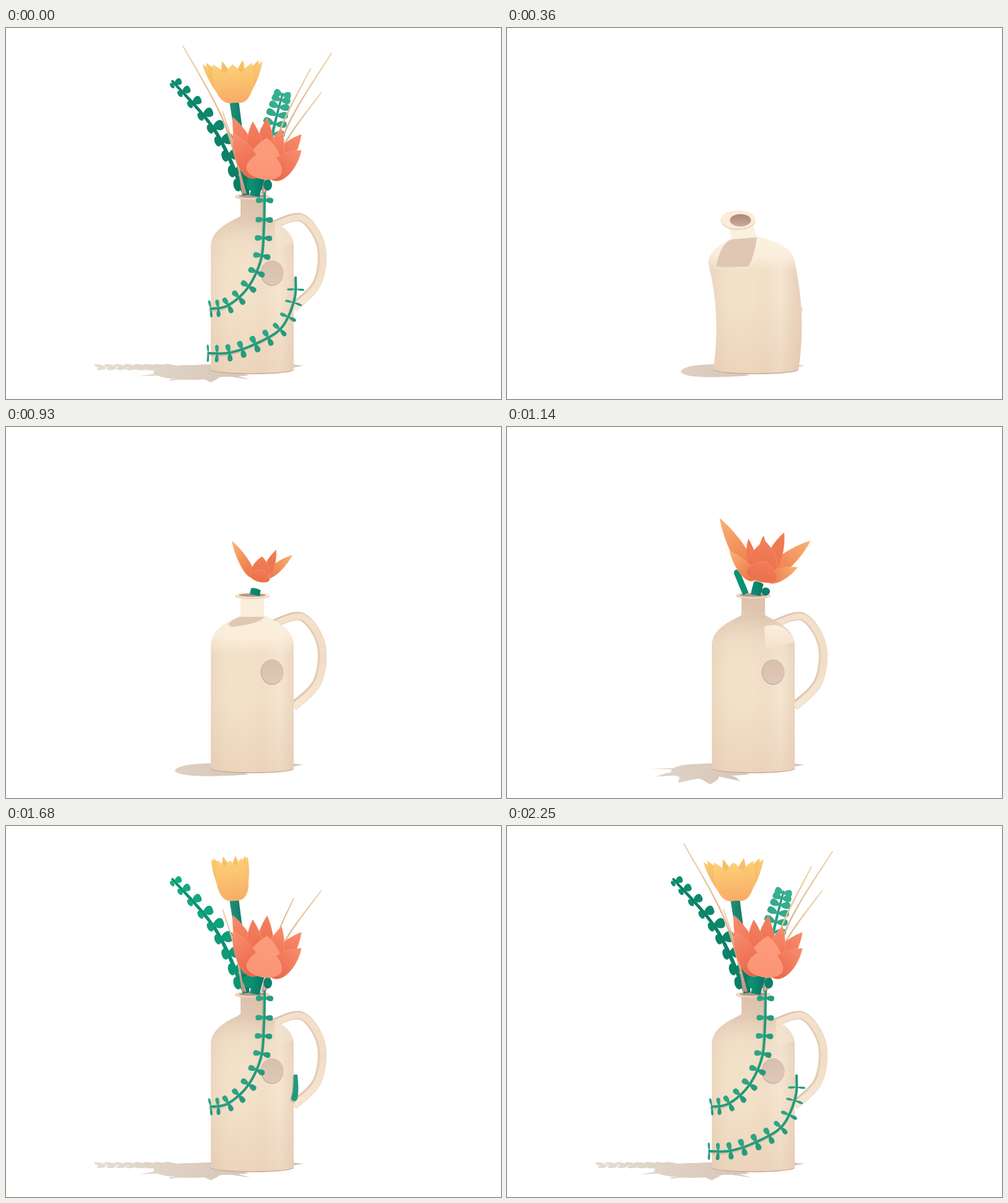
An HTML page with a canvas that plays this animation: 800 px wide and 600 px high, repeating every 2.95 s.

```html
<!DOCTYPE html>
<html lang="en">
<head>
<meta charset="utf-8">
<title>Growing bouquet</title>
<style>
html, body { margin: 0; width: 100%; height: 100%; overflow: hidden; background: #fff; }
canvas { display: block; width: 100vw; height: 100vh; }
</style>
</head>
<body>
<canvas id="stage" width="800" height="600"></canvas>
<script>
const ctx = document.getElementById('stage').getContext('2d');
const LOOP = 2950, STEP = 30, END = 2250, TAU = Math.PI * 2;

const clamp = v => Math.max(0, Math.min(1, v));
const mix = (a, b, k) => a + (b - a) * k;
const ramp = (t, from, to) => clamp((t - from) / (to - from));
const ease = (t, from, to) => { const k = ramp(t, from, to); return k * k * (3 - 2 * k); };

// Piecewise linear value through [time, value] pairs.
function keyed(t, ...keys) {
  for (let i = 1; i < keys.length; i++)
    if (t < keys[i][0]) return mix(keys[i - 1][1], keys[i][1], ramp(t, keys[i - 1][0], keys[i][0]));
  return keys[keys.length - 1][1];
}

function tint(a, b, k) {
  const part = (c, i) => parseInt(c.slice(i, i + 2), 16);
  const hex = i => Math.round(mix(part(a, i), part(b, i), clamp(k))).toString(16).padStart(2, '0');
  return '#' + hex(1) + hex(3) + hex(5);
}

function gradient(x0, y0, x1, y1, ...colors) {
  const g = ctx.createLinearGradient(x0, y0, x1, y1);
  colors.forEach((c, i) => g.addColorStop(i / (colors.length - 1), c));
  return g;
}

function fill(style) { ctx.fillStyle = style; ctx.fill(); }

function oval(x, y, rx, ry, style, turn = 0) {
  ctx.beginPath();
  ctx.ellipse(x, y, Math.max(0, rx), Math.max(0, ry), turn, 0, TAU);
  fill(style);
}

function polygon(points) {
  points.forEach(([x, y], i) => i ? ctx.lineTo(x, y) : ctx.moveTo(x, y));
  ctx.closePath();
}

// Point on a smooth curve through the given points.
function along(points, u) {
  const n = points.length - 1, s = clamp(u) * n, i = Math.min(n - 1, s | 0), f = s - i;
  const a = points[Math.max(i - 1, 0)], b = points[i], c = points[i + 1], d = points[Math.min(i + 2, n)];
  return [0, 1].map(k => b[k] + .5 * f * (c[k] - a[k] +
    f * (2 * a[k] - 5 * b[k] + 4 * c[k] - d[k] + f * (3 * (b[k] - c[k]) + d[k] - a[k]))));
}

function heading(points, u) {
  const a = along(points, u - .01), b = along(points, u + .01);
  return Math.atan2(b[1] - a[1], b[0] - a[0]);
}

function tube(points, grown, w0, w1, style, cap = 1) {
  if (grown <= 0) return;
  const left = [], right = [], n = 48;
  for (let i = 0; i <= n; i++) {
    const u = grown * i / n, [x, y] = along(points, u), h = heading(points, u), w = mix(w0, w1, i / n) / 2;
    left.push([x + Math.sin(h) * w, y - Math.cos(h) * w]);
    right.unshift([x - Math.sin(h) * w, y + Math.cos(h) * w]);
  }
  ctx.beginPath();
  polygon([...left, ...right]);
  fill(style);
  const [x, y] = along(points, grown);
  oval(x, y, w1 / 2 * cap, w1 / 2, style, heading(points, grown));
}

function leaf(x, y, angle, length, width, style) {
  if (length <= 0) return;
  ctx.save();
  ctx.translate(x, y);
  ctx.rotate(angle);
  ctx.beginPath();
  ctx.moveTo(0, 0);
  ctx.bezierCurveTo(length * .35, -width * .7, length * 1.05, -width * .85, length, 0);
  ctx.bezierCurveTo(length * 1.05, width * .85, length * .35, width * .7, 0, 0);
  fill(style);
  ctx.restore();
}

function petal(tx, ty, bx, by, half, tipColor, baseColor) {
  const dx = tx - bx, dy = ty - by, len = Math.hypot(dx, dy) || 1;
  const at = (k, out) => [bx + dx * k - dy / len * out, by + dy * k + dx / len * out];
  ctx.beginPath();
  ctx.moveTo(bx, by);
  ctx.bezierCurveTo(...at(.05, -half * 1.6), ...at(.7, -half), tx, ty);
  ctx.bezierCurveTo(...at(.7, half), ...at(.05, half * 1.6), bx, by);
  fill(gradient(tx, ty, bx, by, tipColor, baseColor));
  ctx.strokeStyle = 'rgba(255,190,140,.4)';
  ctx.lineWidth = .8;
  ctx.stroke();
}

// Rings of petals around a tilted cup, painted from back to front.
function bloom(f, openAt, paint) {
  const petals = [];
  f.rings.forEach(({ count, radius, depth, rise }, ring) => {
    for (let i = 0; i < count; i++) {
      const a = TAU * (.25 + i / count), cos = Math.cos(a), sin = Math.sin(a);
      petals.push({ ring, i, cos, sin, radius, depth, rise, order: sin * (ring ? .4 : 1) });
    }
  });
  petals.sort((a, b) => a.order - b.order);
  for (const p of petals) {
    const open = openAt(p);
    if (open <= 0) continue;
    const bx = f.x + p.cos * f.cup, by = f.y + p.sin * f.cup * .4;
    const reach = p.cos * p.radius * f.spread;
    const tx = mix(bx, f.tipX + reach, open);
    const ty = mix(by, f.y - p.rise + p.sin * p.depth + reach * f.tilt, open);
    petal(tx, ty, bx, by, (f.width + f.front * Math.max(0, p.sin) ** 3) * open, ...paint(p));
  }
}

const HANDLE = [[464, 452], [503, 412], [509, 352], [478, 307], [432, 318]];
const STALK = [[386, 270], [339, 168], [269, 86]];
const FERN = [[412, 262], [432, 165], [447, 106]];
const YELLOW_STEM = [[388, 270], [380, 200], [369, 121]];
const CORAL_STEM = [[402, 272], [404, 262], [411, 238]];
const VINE_TOP = [[418, 266], [417, 320], [412, 375], [390, 421], [358, 449], [331, 454]];
const VINE_LOW = [[468, 402], [466, 440], [445, 485], [405, 510], [362, 525], [327, 526]];

function groundShadow(t, h) {
  const left = mix(331, 273, Math.min(1, h));
  ctx.beginPath();
  ctx.moveTo(345, 544);
  ctx.bezierCurveTo(mix(left, 331, .4), 543, left + 1, 549, left, 556);
  ctx.bezierCurveTo(left + 5, 565, 320, 567, 392, 562);
  ctx.closePath();
  polygon([[481, 546], [460, 544], [460, 550]]);
  const blot = (x, y, rx, ry, turn = 0) => {
    ctx.moveTo(x + rx * Math.cos(turn), y + rx * Math.sin(turn));
    ctx.ellipse(x, y, rx, ry, turn, 0, -TAU, true);
  };

  // Spiky shadow of the open flower.
  const open = ramp(t, 880, 1110), settled = ease(t, 1140, 1400);
  if (open > 0) {
    blot(mix(305, 300, settled), 557, mix(40, 62, settled) * open, 12 * open);
    for (let i = 0; i < 5; i++) {
      const a = Math.PI * (1.04 - i * .19), rx = mix(90, 118, settled) * open, ry = mix(23, 18, settled) * open;
      const x = 320 + Math.cos(a) * rx, y = 555 + Math.sin(a) * ry;
      polygon([[305, 551], [mix(305, x, .6) - 9, mix(552, y, .6)], [x, y], [mix(330, x, .6) + 12, mix(558, y, .6)], [345, 556]]);
    }
  }
  const reach = ramp(t, 1140, 1430);
  if (reach > 0) polygon([[300, 547], [mix(300, 150, reach), 546], [300, 553]]);
  for (let i = 0; i < 8; i++) {
    const k = ease(t, 1270 + i * 40, 1380 + i * 40), x = 268 - i * 16.5;
    if (k > 0) for (const side of [-1, 1]) blot(x + side * 2, 548.5 + side * 2, (12 - i * .6) * k, 2.6 * k, -side * .15);
  }
  fill(gradient(140, 0, 370, 0, '#e5dcd1', '#dfd2c6', '#d8c7ba'));
}

function handle(t) {
  const grown = keyed(t, [320, 0], [360, .045], [690, .52], [900, 1]);
  const swell = 1 - ease(t, 700, 960);
  const path = HANDLE.map(([x, y], i) => [x + swell * 3.2 * Math.min(i, 2), y]);
  const tip = mix(13, 24, swell);
  tube(path, grown, 15, tip, gradient(466, 0, 518, 0, '#dfc4b0', '#e8d1ba'), .35);
  tube(path.map(([x, y]) => [x + 1.5, y + .5]), grown, 11, tip * .72,
    gradient(0, 300, 0, 455, '#f3e1cb', '#f1ddc5', '#f6e8d4'), .35);
}

// Half width of the bottle at height v.
function radius(v) {
  const q = clamp((v - 198) / 50);
  return 19 + 48 * (1 - q ** 2.4);
}

function vase(t, h, bend) {
  const w = keyed(t, [30, .3], [180, 1.06], [360, 1.03], [570, 1]);
  const lean = bend * Math.min(1, h / .865);
  const place = (u, v) => {
    const s = v / 282;
    return [398 + 4 * lean + u * w + lean * (38 * s - 67 * s * s), 553 - v * h - lean * u * .1 * s];
  };
  const left = [], right = [];
  for (let v = 0; v <= 277; v += 3) {
    left.push(place(-radius(v), v));
    right.unshift(place(radius(v), v));
  }
  const shaded = ease(t, 900, 1120);
  const [footX, footY] = place(0, 0);
  const base = () => ctx.bezierCurveTo(footX + 62 * w, footY + 9, footX - 62 * w, footY + 9, ...left[0]);

  ctx.save();
  ctx.beginPath();
  left.forEach(p => ctx.lineTo(...p));
  right.forEach(p => ctx.lineTo(...p));
  base();
  ctx.closePath();
  fill(gradient(331, 0, 470, 0, '#ecd7c0', '#f2e1c8', '#f3e2c9', '#f1dec6', '#f4e5d0', '#ead2bb'));
  ctx.clip();

  const layer = (y0, y1, ...colors) => {
    ctx.fillStyle = gradient(0, y0, 0, y1, ...colors);
    ctx.fillRect(280, 0, 240, 600);
  };
  const top = place(0, 243)[1], shoulder = place(0, 185)[1];
  layer(440, 560, 'rgba(221,185,160,0)', 'rgba(221,185,160,.32)');
  ctx.globalAlpha = 1 - shaded;
  layer(top, shoulder, 'rgba(253,243,226,.85)', 'rgba(253,243,226,.75)', 'rgba(253,243,226,0)');

  // Shadow of the neck across the shoulder.
  const a = place(-19, 246), b = place(mix(-39, -56, bend), mix(234, 198, bend));
  const c = place(mix(-28, -6, bend), mix(230, 194, bend)), d = place(19, 246);
  ctx.beginPath();
  ctx.moveTo(...a);
  ctx.quadraticCurveTo(mix(a[0], b[0], .7), a[1] + 4, ...b);
  ctx.quadraticCurveTo(mix(b[0], c[0], .5), c[1] + 2, ...c);
  ctx.quadraticCurveTo(d[0] - 3, mix(c[1], d[1], .4), ...d);
  fill('#dfc7b3');

  ctx.globalAlpha = shaded;
  layer(270, 385, 'rgba(196,160,143,.5)', 'rgba(200,166,148,.42)', 'rgba(215,190,172,.12)', 'rgba(215,190,172,0)');

  // Light that still falls on the right shoulder.
  const moved = ease(t, 1140, 1350), edge = mix(416, 434, moved);
  ctx.globalAlpha = shaded * mix(.95, .5, moved);
  ctx.beginPath();
  ctx.moveTo(edge, mix(323, 306, moved));
  ctx.quadraticCurveTo(445, 312, 467, 346);
  ctx.quadraticCurveTo(440, 358, edge + 2, 357);
  fill(gradient(0, 315, 0, 360, '#fdf1df', '#f2e2cd'));
  ctx.globalAlpha = 1;

  const disc = ease(t, 470, 600);
  oval(430, 396.5, 18.5 * disc, 20.5 * disc, '#cdb09f');
  oval(430.5, 396, 17.5 * disc, 19.5 * disc, gradient(0, 376, 0, 416, '#d8bfae', '#dfc8b7'));
  ctx.beginPath();
  ctx.moveTo(...right[right.length - 1]);
  base();
  ctx.strokeStyle = 'rgba(176,130,112,.6)';
  ctx.lineWidth = 2.5;
  ctx.stroke();
  ctx.restore();

  const [lx, ly] = place(0, 281), size = Math.min(1, w), ry = mix(4.5, 15, bend);
  oval(lx, ly + 1.5, 28 * size, ry, '#e3cab5');
  oval(lx, ly, 28 * size, ry, tint('#fbecd8', '#ecd9c6', shaded));
  oval(lx + 4 * bend, ly + bend, mix(22, 17, bend) * size, mix(2.8, 10, bend),
    gradient(0, ly - 8, 0, ly + 9, '#ad877c', '#c9a697'));
}

// Grass blade that bows towards the middle of the bouquet.
function grass(t, x, y, root, from, to) {
  tube([[root, 268], [mix(x, root, .64), (y + 268) / 2], [x, y]], ramp(t, from, to), 3.6, 1.8,
    gradient(0, y, 0, 268, '#ecd2a4', '#dfba93', '#c39586'));
}

function fern(t) {
  tube(FERN, ramp(t, 1700, 1910), 6, 3, '#2b9f80');
  for (let i = 0; i < 7; i++) {
    const u = .36 + i * .1, [x, y] = along(FERN, u), h = heading(FERN, u);
    const k = ease(t, 1790 + i * 30, 1910 + i * 30), len = (22 - i * 1.3) * k;
    for (const side of [-1, 1]) leaf(x, y, h + side * 1.35, len, 9.5 * k, tint('#2ba384', '#3bb393', i / 7));
  }
}

function leafStalk(t) {
  const grown = keyed(t, [1050, 0], [1140, .2], [1440, .94], [1530, 1]);
  const deep = ease(t, 1650, 2000) * .4;
  tube(STALK, grown, mix(10, 7, ease(t, 1150, 1400)), mix(10, 4, ease(t, 1150, 1350)), tint('#0b9171', '#0a6658', deep));
  for (let i = 0; i < 9; i++) {
    const u = .12 + i * .105, [x, y] = along(STALK, u), h = heading(STALK, u);
    const k = ease(t, 1220 + i * 36, 1350 + i * 36), size = mix(25, 12, i / 8) * k;
    const tone = tint(tint('#0b9373', '#14ae84', i / 8), '#075f52', deep);
    oval(x + Math.sin(h) * 5 * k, y - Math.cos(h) * 5 * k, size * .42, size * .25, tone, h + .15);
    leaf(x, y, h + 1.9, size, size * .78, tone);
  }
}

function yellowFlower(t) {
  tube(YELLOW_STEM, ramp(t, 1190, 1410), 11, 15, gradient(360, 0, 392, 0, '#239079', '#0b7362'), .3);
  const bud = ease(t, 1390, 1440), settled = ease(t, 1680, 1900);
  if (t < 1560) {
    oval(368, 115, 12 * bud, 5.5 * bud, '#f6b562');
    oval(369, 112, 7 * bud, 2.5 * bud, '#fbd47c');
  }
  bloom({
    x: 370, y: 119, tipX: mix(361, 366, settled), cup: 5, spread: mix(.6, 1, settled), tilt: -.05,
    width: 10, front: 13, rings: [{ count: 9, radius: 49, depth: 3, rise: mix(66, 63, settled) }]
  }, ({ i }) => keyed(t, [1440, 0], [1590 + i * 8, 1.04], [1680 + i * 12, 1]),
  ({ sin, i }) => [tint('#f8c765', '#fcd277', (sin + 1) / 2), tint('#ec9a4c', '#f8ab66', sin * .7 + .3 + i % 2 * .2)]);
}

function coralFlower(t) {
  tube(CORAL_STEM, keyed(t, [640, 0], [690, .22], [1140, .7], [1300, 1]), 16, 16,
    gradient(394, 0, 416, 0, '#0c9274', '#087562'), .2);
  const settled = ease(t, 1140, 1380);
  bloom({
    x: mix(409, 415, settled), y: mix(246, 240, settled), tipX: mix(417, 422, settled), cup: 11,
    spread: mix(1.32, 1, settled), tilt: .25, width: mix(13, 16, settled), front: 13,
    rings: [
      { count: 6, radius: 64, depth: mix(34, 26, settled), rise: mix(63, 69, settled) },
      { count: 3, radius: 27, depth: 14, rise: 76 }
    ]
  }, ({ i }) => keyed(t, [820 + i % 2 * 180, 0], [1020 + i % 2 * 200, 1.12], [1140 + i % 2 * 200, 1]),
  ({ ring, sin, cos, i }) => {
    const ripe = tint(i % 2 ? '#f4805f' : '#f98d6b', '#fc9c7c', sin);
    const early = ring || Math.abs(cos) < .1 ? '#f27d58' : '#f8b472';
    return [tint(early, ripe, settled), tint('#ea7048', sin > .9 ? '#fa9374' : '#ea6248', settled)];
  });
}

function lowLeaves(t) {
  const rise = ease(t, 1140, 1560), ball = ease(t, 1020, 1130), side = ease(t, 1260, 1400);
  oval(mix(418, 423, rise), mix(266, 254, rise), 7 * ball, mix(6.5, 9, rise) * ball, '#0d806a');
  oval(396, 251, 7 * side, 11 * side, '#0a9070', .2);
}

function vine(t, path, from, to, first, leafStart) {
  const grown = ramp(t, from, to);
  const tip = mix(10, 4, ease(t, to, to + 150)), root = mix(6, 4, ease(t, from + 100, to + 60));
  tube(path.map(([x, y]) => [x - 2, y + 3]), grown, root, tip, 'rgba(150,105,90,.2)');
  tube(path, grown, root, tip, '#239b7b');
  for (let i = 0; i < 10; i++) {
    const u = mix(first, 1, i / 9), [x, y] = along(path, u), h = heading(path, u);
    const k = ease(t, leafStart + i * 29, leafStart + 130 + i * 29);
    // Leaves turn edge-on towards the sides of the bottle.
    const facing = Math.sqrt(Math.max(.15, 1 - ((x - 398) / 74) ** 2));
    for (const side of [-1, 1])
      leaf(x, y, h + side * 1.5, 14 * k, 8 * facing * k, side > 0 ? '#2da585' : '#259b7c');
  }
}

function draw(t) {
  ctx.fillStyle = '#fff';
  ctx.fillRect(0, 0, 800, 600);
  const h = keyed(t, [30, .03], [180, .55], [360, .865], [510, 1.02], [600, 1]);
  const bend = keyed(t, [30, .2], [240, 1], [360, 1], [450, .45], [540, .08], [620, 0]);
  groundShadow(t, h);
  handle(t);
  vase(t, h, bend);
  fern(t);
  grass(t, 492, 66, 414, 1450, 1770);
  grass(t, 526, 41, 418, 1650, 1950);
  grass(t, 509, 105, 418, 1230, 1560);
  yellowFlower(t);
  leafStalk(t);
  grass(t, 286, 29, 387, 1650, 2000);
  grass(t, 350, 135, 383, 1230, 1500);
  lowLeaves(t);
  coralFlower(t);
  vine(t, VINE_TOP, 1170, 1420, .06, 1230);
  vine(t, VINE_LOW, 1620, 1920, .12, 1730);
}

const start = performance.now();
function frame() {
  const t = Math.floor(((performance.now() - start) % LOOP) / STEP) * STEP;
  // The finished bouquet shows for one step before the growth begins.
  draw(t < STEP ? END : Math.min(t, END));
  requestAnimationFrame(frame);
}
frame();
</script>
</body>
</html>
```
